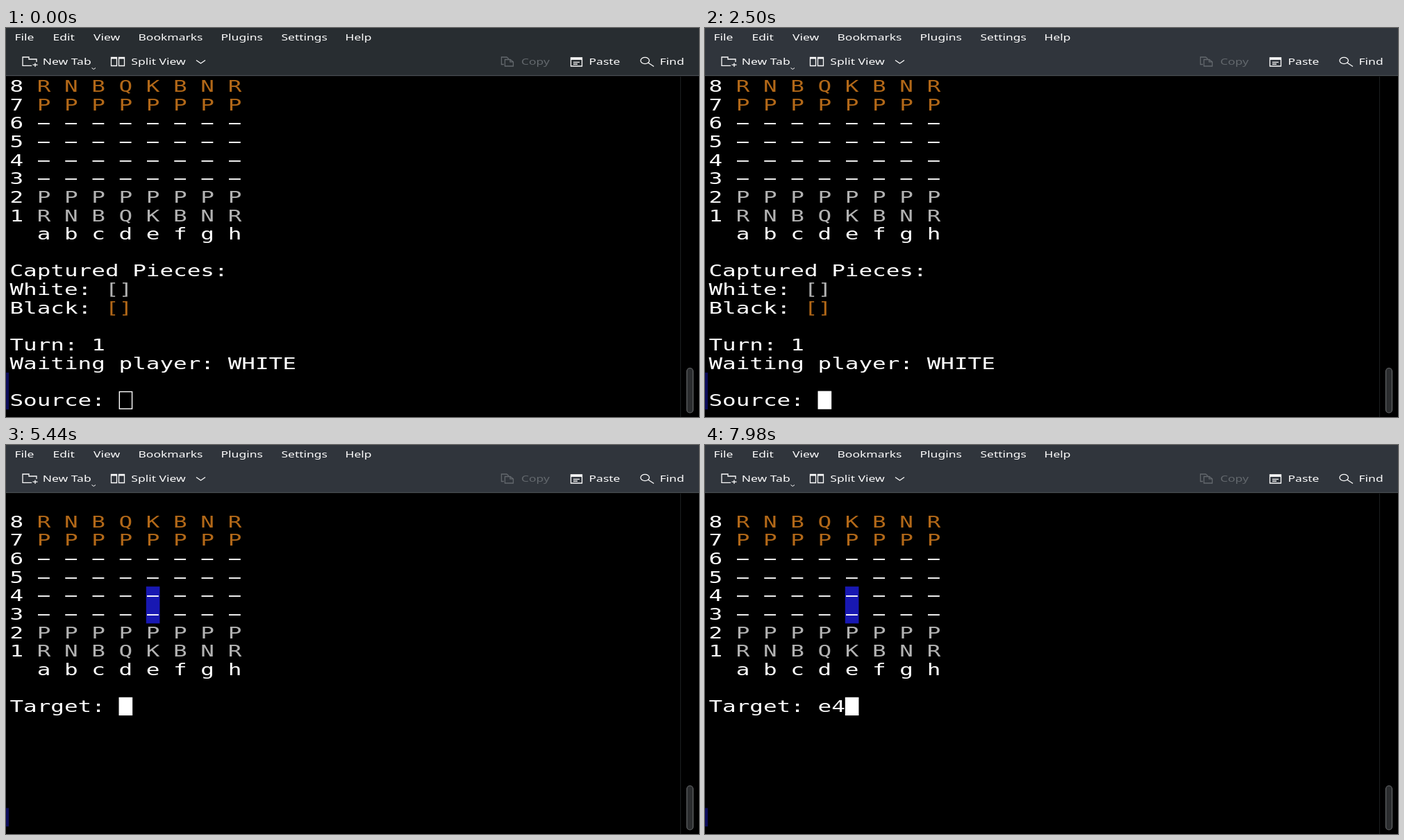
These frames come from a looping animation (998x561 px, 8 s). An HTML page with a canvas:

```html
<!DOCTYPE html>
<html lang="en">
<head>
<meta charset="utf-8">
<title>Terminal chess</title>
<style>
  html, body { margin: 0; width: 100%; height: 100%; overflow: hidden; background: #000; }
  canvas { display: block; }
</style>
</head>
<body>
<canvas id="stage" width="998" height="561"></canvas>
<script>
const ctx = document.getElementById('stage').getContext('2d');
const LOOP = 8000;
const ASPECT = 1.4265; // the whole screen is shown wider than tall
const CELL = { x: 5.4, y: 71, w: 19.64, h: 26.62 };
const WHITE = '#fff', AMBER = '#b26818', GREY = '#b2b2b2', BLUE = '#1818b2', DIM_BLUE = '#0b0b59';
const INK = '#fcfcfc', DISABLED = '#63686d';

// Moments of the session, in ms
const MOUSE_IN = 1000, MOUSE_REST = 1240, FOCUS = 2000;
const SHOW_MOVES = 4000, MARK_FADE = 4700;
const SOURCE_KEYS = [[0, ''], [2840, 'e'], [3080, 'e2']];
const TARGET_KEYS = [[0, ''], [5500, 'e'], [6000, 'e5'], [6880, 'e'], [7180, 'e4']];

const typed = (keys, t) => keys.filter(([at]) => at <= t).pop()[1];
const colX = col => CELL.x + col * CELL.w;
const rowY = row => CELL.y + row * CELL.h;

function rect(x, y, w, h, color) {
  ctx.fillStyle = color;
  ctx.fillRect(x, y, w, h);
}

function label(text, x, y, color) {
  ctx.save();
  ctx.scale(ASPECT, 1);
  ctx.fillStyle = color;
  ctx.fillText(text, x / ASPECT, y);
  ctx.restore();
}

function stroke(path, color = INK, width = 1.3) {
  ctx.strokeStyle = color;
  ctx.lineWidth = width;
  ctx.stroke(new Path2D(path));
}

// Terminal text sits on a fixed character grid
function print(text, col, row, color = WHITE) {
  ctx.font = '22.87px "DejaVu Sans Mono", monospace';
  [...text].forEach((char, i) => label(char, colX(col + i), rowY(row) + 21.2, color));
}

function drawHeader(focused) {
  rect(0, 0, 998, 69, focused ? '#30353c' : '#282d31');
  rect(0, 68, 998, 1.2, '#4b5055');

  ctx.font = '12.25px "Noto Sans", sans-serif';
  const menu = { File: 12.5, Edit: 67.5, View: 126, Bookmarks: 190.5, Plugins: 309.5, Settings: 396.5, Help: 488.5 };
  for (const name in menu) label(name, menu[name], 18.3, INK);
  const tools = { 'New Tab': 52.7, 'Split View': 180.3, Paste: 839.5, Find: 941.5 };
  for (const name in tools) label(name, tools[name], 53, INK);
  label('Copy', 742, 53, DISABLED);

  // New tab, with its small menu arrow
  stroke('M37 54.4H24V42H33V45H44V49 M38.5 53.2H45.5 M42 50.5V56');
  stroke('M123.5 57.5L126.3 59.5L129 57.5', INK, 1);
  // Split view and its chevron
  stroke('M151.5 42.5H159.5V54.5H151.5Z M162.5 42.5H170.5V54.5H162.5Z');
  stroke('M151 43.2H160 M162 43.2H171', INK, 2.4);
  stroke('M274 46.5L280.5 51L287 46.5');
  // Copy
  stroke('M717 52.5H713.5V42H721L724 44.5 M718.5 45.5H726L730.5 48.8V55H718.5Z M726 45.5V48.8H730.5', DISABLED);
  // Paste
  stroke('M813.5 43H829.5V55H813.5Z M817 49.3H826 M817 52H823');
  stroke('M813 44.3H830', INK, 3.2);
  // Find
  stroke('M914 47a6.2 4.6 0 1 0 12.4 0a6.2 4.6 0 1 0 -12.4 0 M925 50.3L933 55.5');
}

function drawBoard(top) {
  const back = 'RNBQKBNR', pawns = 'PPPPPPPP', empty = '\u2212'.repeat(8);
  const ranks = [back, pawns, empty, empty, empty, empty, pawns, back];
  ranks.forEach((rank, i) => {
    print(String(8 - i), 0, top + i);
    print([...rank].join(' '), 2, top + i, i < 2 ? AMBER : i > 5 ? GREY : WHITE);
  });
  print('a b c d e f g h', 2, top + 8);
}

function drawPrompt(name, entry, row, focused) {
  const text = name + ': ' + entry;
  print(text, 0, row);
  const x = colX(text.length), y = rowY(row);
  if (focused) {
    rect(x, y, CELL.w, CELL.h - 0.4, WHITE);
  } else {
    ctx.strokeStyle = WHITE;
    ctx.lineWidth = 1.4;
    ctx.strokeRect(x + 0.8, y + 1, CELL.w - 1.4, CELL.h - 2);
  }
}

function drawSourceScreen(t) {
  rect(0, rowY(16), 4, CELL.h * 2, DIM_BLUE);
  drawBoard(0);
  print('Captured Pieces:', 0, 10);
  print('White:', 0, 11);
  print('[]', 7, 11, GREY);
  print('Black:', 0, 12);
  print('[]', 7, 12, AMBER);
  print('Turn: 1', 0, 14);
  print('Waiting player: WHITE', 0, 15);
  drawPrompt('Source', typed(SOURCE_KEYS, t), 17, t >= FOCUS);
}

function drawTargetScreen(t) {
  rect(0, rowY(17), 4, CELL.h, t < MARK_FADE ? BLUE : DIM_BLUE);
  rect(colX(10), rowY(5), CELL.w, CELL.h * 2, BLUE);
  drawBoard(1);
  drawPrompt('Target', typed(TARGET_KEYS, t), 11, true);
}

function drawScrollbar(y) {
  rect(971, 70, 1, 491, '#1c1e20');
  ctx.beginPath();
  ctx.roundRect(980.5, y, 9, 555 - y, 4.5);
  ctx.fillStyle = '#2b2d2f';
  ctx.fill();
  ctx.strokeStyle = '#626466';
  ctx.lineWidth = 1.2;
  ctx.stroke();
}

function drawMouse(t) {
  if (t < MOUSE_IN || t >= FOCUS) return;
  const left = 1 - Math.min(1, (t - MOUSE_IN) / (MOUSE_REST - MOUSE_IN));
  ctx.save();
  ctx.translate(773 + 222 * left ** 2, 421.5 + 60 * left ** 2);
  stroke('M-4 -7.5H4 M0 -7.5V7.5 M-4 7.5H4', WHITE, 1.7);
  ctx.restore();
}

function draw() {
  const t = performance.now() % LOOP;
  const choosing = t >= SHOW_MOVES;
  rect(0, 0, 998, 561, '#000');
  drawHeader(t >= FOCUS);
  if (choosing) drawTargetScreen(t);
  else drawSourceScreen(t);
  drawScrollbar(choosing ? 491.5 : 490.5);
  drawMouse(t);
  requestAnimationFrame(draw);
}
draw();
</script>
</body>
</html>
```
